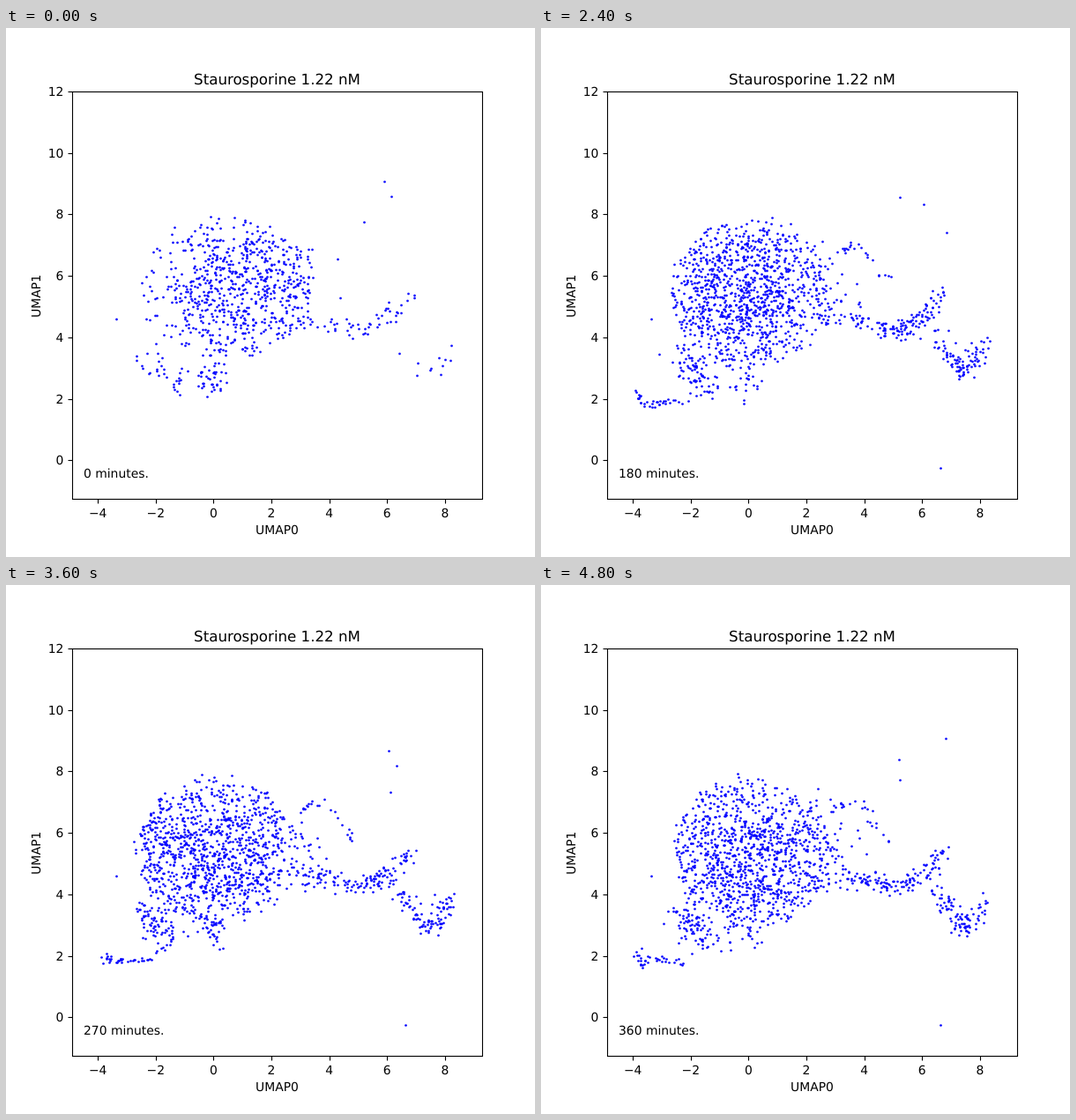
An HTML page with a canvas for the animation above (5.2 s loop, 600 px wide and 600 px high).

```html
<!DOCTYPE html>
<html lang="en">
<head>
<meta charset="utf-8">
<title>UMAP over time</title>
<style>
  html, body { margin: 0; width: 100%; height: 100%; overflow: hidden; background: #fff; }
  canvas { display: block; width: 600px; height: 600px; }
</style>
</head>
<body>
<canvas id="plot" width="600" height="600"></canvas>
<script>
const ctx = document.getElementById('plot').getContext('2d');
const STEP_MS = 400, STEPS = 13, MINUTES = 30;
const LEFT = 75, RIGHT = 540, TOP = 72, BOTTOM = 534;
const toX = v => 235.4 + v * 32.8;
const toY = v => 490.4 - v * 34.87;
const snap = v => Math.floor(v + 0.5) + 0.5;

// Thin groups around the main cloud: points strewn along a path, growing in number
const groups = [
  { name: 'foot', path: [[157, 368], [185, 405]], from: 24, to: 75, spread: 9 },
  { name: 'toe', path: [[165, 427], [133, 424], [115, 429], [110, 412]], from: 0, to: 34, spread: 2.5 },
  { name: 'drip', path: [[195, 400], [238, 385], [234, 412]], from: 46, to: 32, spread: 8 },
  { name: 'arm', path: [[322, 332], [370, 333], [402, 342], [432, 330], [456, 303]], from: 55, to: 135, spread: 6 },
  { name: 'hook', path: [[447, 347], [480, 392], [503, 357]], from: 11, to: 90, spread: 6 },
  { name: 'brow', path: [[335, 252], [362, 246], [395, 288]], from: 3, to: 22, spread: 4 },
  { name: 'haze', path: [[300, 250], [345, 315]], from: 14, to: 40, spread: 14 }
];

function seededRandom(seed) {
  return () => {
    seed = (seed + 0x6D2B79F5) | 0;
    let t = Math.imul(seed ^ (seed >>> 15), 1 | seed);
    t ^= t + Math.imul(t ^ (t >>> 7), 61 | t);
    return ((t ^ (t >>> 14)) >>> 0) / 4294967296;
  };
}

function along(path, t) {
  const i = Math.floor(t * (path.length - 1));
  const part = t * (path.length - 1) - i;
  const [x1, y1] = path[i], [x2, y2] = path[i + 1];
  return [x1 + (x2 - x1) * part, y1 + (y2 - y1) * part];
}

function makePoints(step) {
  const random = seededRandom(step * 101 + 7);
  const gauss = () => Math.sqrt(-2 * Math.log(1 - random())) * Math.cos(2 * Math.PI * random());
  const points = [[125, 330]];
  if (step > 0) points.push([453, 499]);

  // Main cloud: a bell curve cut off by an ellipse. It starts on the right,
  // settles left and drifts down to the right again at the end.
  const early = Math.exp(-step / 1.5);
  const late = Math.max(0, step - 8) * 3;
  const total = 680 + 360 * Math.min(1, step / 2);
  for (let n = 0; n < total;) {
    const x = 220 + 58 * early + late + gauss() * 66;
    const y = 302 + late + gauss() * 56;
    const dx = (x - 238 - 12 * early) / (90 + 10 * early);
    const dy = (y - 301 + 7 * early) / (86 - 6 * early);
    if (Math.hypot(dx, dy) > 1 + gauss() * 0.03) continue;
    points.push([x, y]);
    n++;
  }

  const growth = Math.min(1, step / 5);
  for (const { path, from, to, spread } of groups) {
    const count = Math.round(from + (to - from) * growth);
    for (let n = 0; n < count; n++) {
      const [x, y] = along(path, random());
      points.push([x + gauss() * spread, y + gauss() * spread]);
    }
  }

  // A few strays, upper right
  for (let n = 0; n < 3; n++) points.push([400 + 68 * random(), 173 + 65 * random()]);
  return points;
}

function text(label, x, y, align = 'center', size = 13.89) {
  ctx.font = `${size}px "DejaVu Sans", sans-serif`;
  ctx.textRendering = 'geometricPrecision';
  ctx.textAlign = align;
  ctx.fillText(label, x, y);
}

function line(x1, y1, x2, y2) {
  ctx.beginPath();
  ctx.moveTo(x1, y1);
  ctx.lineTo(x2, y2);
  ctx.stroke();
}

function drawAxes() {
  ctx.strokeStyle = ctx.fillStyle = '#000';
  ctx.lineWidth = 1.11;
  ctx.strokeRect(LEFT + 0.5, TOP + 0.5, RIGHT - LEFT, BOTTOM - TOP);
  for (let v = -4; v <= 8; v += 2) {
    const x = snap(toX(v));
    line(x, BOTTOM + 0.5, x, BOTTOM + 5.5);
    text(String(v).replace('-', '\u2212'), toX(v), 555);
  }
  for (let v = 0; v <= 12; v += 2) {
    const y = snap(toY(v));
    line(LEFT + 0.5, y, LEFT - 4.5, y);
    text(v, 65.3, Math.round(toY(v)) + 5, 'right');
  }
  text('Staurosporine 1.22 nM', 307.5, 64, 'center', 16.67);
  text('UMAP0', 307.5, 574);
  ctx.save();
  ctx.translate(39, 304);
  ctx.rotate(-Math.PI / 2);
  text('UMAP1', 0, 0);
  ctx.restore();
}

const clouds = Array.from({ length: STEPS }, (_, step) => makePoints(step));
let shown = -1;

function draw(step) {
  ctx.fillStyle = '#fff';
  ctx.fillRect(0, 0, 600, 600);
  ctx.fillStyle = '#00f';
  for (const [x, y] of clouds[step]) {
    ctx.beginPath();
    ctx.arc(snap(x), snap(y), 1.35, 0, 2 * Math.PI);
    ctx.fill();
  }
  drawAxes();
  text(`${step * MINUTES} minutes.`, 88, 510, 'left');
}

function tick() {
  const step = Math.floor(performance.now() / STEP_MS) % STEPS;
  if (step !== shown) draw(shown = step);
  requestAnimationFrame(tick);
}
tick();
</script>
</body>
</html>
```
